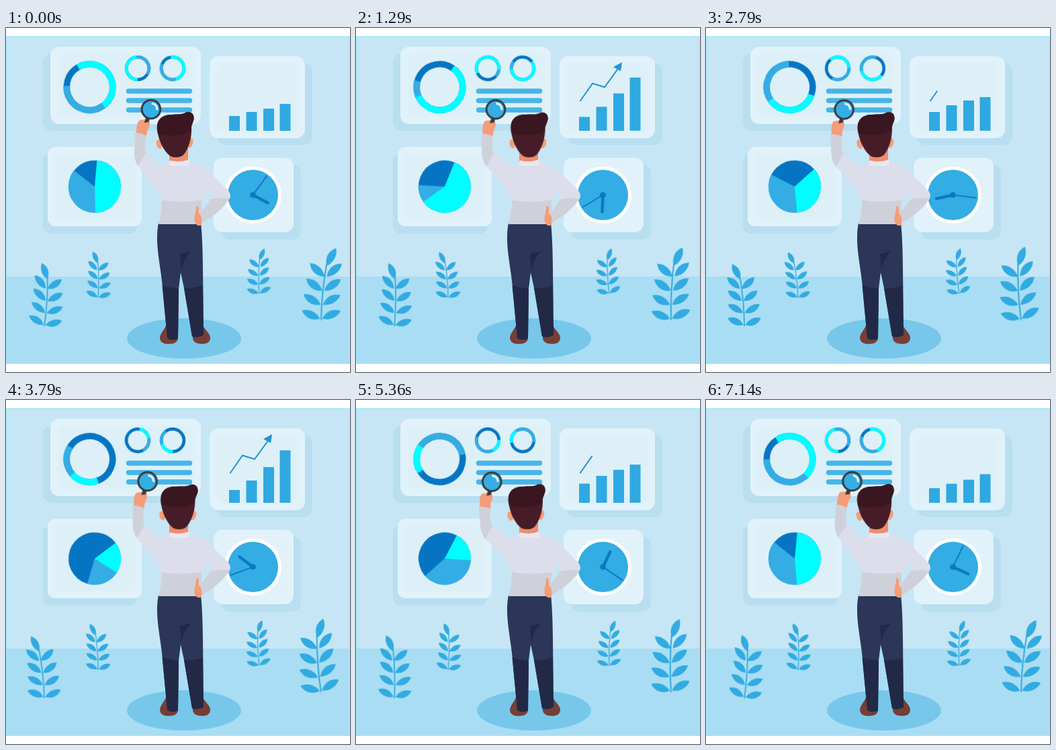
Recreate the animation shown at these times as an HTML page. Size 512 px wide and 512 px high, loop 7.21 s.

```html
<!DOCTYPE html>
<html lang="en">
<head>
<meta charset="utf-8">
<title>Dashboard analysis</title>
<style>
html, body { margin: 0; width: 100%; height: 100%; overflow: hidden; background: #fff; }
svg { display: block; width: 100vw; height: 100vh; }

:root { --loop: 7210ms; --beat: 2403.33ms; --sine: cubic-bezier(.37, 0, .63, 1); }

/* Plants, arm and head swing between two angles */
.swing { animation: swing var(--half) var(--sine) var(--delay, 0ms) infinite alternate; }
@keyframes swing { from { transform: rotate(var(--from)); } to { transform: rotate(var(--to)); } }
.plant { --half: 3605ms; }
.person { --half: 1201.67ms; }

/* Charts: two arcs laid over a dark disc */
.arc { fill: none; }
.dark { stroke: #0575c3; }
.mid { stroke: #33ade4; animation: mid var(--loop) linear infinite; }
.cyan { stroke: #00fdff; animation: cyan var(--loop) linear infinite; }
@keyframes cyan {
  0%, 100% { stroke-dasharray: 173 360; }
  13.9% { stroke-dasharray: 229 360; }
  63.9% { stroke-dasharray: 23 360; }
}
@keyframes mid {
  0%, 98.5%, 100% { stroke-dasharray: 303 360; }
  17.9% { stroke-dasharray: 251 360; }
  38.7% { stroke-dasharray: 249 360; }
  52.6% { stroke-dasharray: 143 360; }
  66.4% { stroke-dasharray: 219 360; }
  83.2% { stroke-dasharray: 181 360; }
}
.spin { animation: spin var(--loop) linear infinite; }
@keyframes spin { from { transform: rotate(0deg); } to { transform: rotate(360deg); } }
.drift { animation: drift var(--loop) linear infinite; }
@keyframes drift {
  0%, 100% { transform: rotate(5deg); }
  17.9% { transform: rotate(22deg); }
  38.7% { transform: rotate(48deg); }
  50% { transform: rotate(56deg); }
  66.4% { transform: rotate(37deg); }
  83.2% { transform: rotate(17deg); }
}

.minute { animation: minute var(--loop) linear infinite; }
@keyframes minute {
  0% { transform: rotate(36deg); }
  17.9% { transform: rotate(239deg); }
  38.7% { transform: rotate(457deg); }
  52.6% { transform: rotate(610deg); }
  66.4% { transform: rotate(756deg); }
  83.2% { transform: rotate(942deg); }
  100% { transform: rotate(1116deg); }
}

.bar { animation: var(--beat) linear infinite; }
.bar:nth-child(1) { animation-name: bar1; }
.bar:nth-child(2) { animation-name: bar2; }
.bar:nth-child(3) { animation-name: bar3; }
.bar:nth-child(4) { animation-name: bar4; }
@keyframes bar1 {
  0%, 100% { transform: scaleY(.22); }
  16% { transform: scaleY(.28); }
  30% { transform: scaleY(.29); }
  50% { transform: scaleY(.22); }
  58% { transform: scaleY(.19); }
}
@keyframes bar2 {
  0%, 100% { transform: scaleY(.28); }
  16% { transform: scaleY(.38); }
  33% { transform: scaleY(.43); }
  50% { transform: scaleY(.38); }
  58% { transform: scaleY(.33); }
}
@keyframes bar3 {
  0%, 100% { transform: scaleY(.33); }
  16% { transform: scaleY(.45); }
  42% { transform: scaleY(.6); }
  50% { transform: scaleY(.58); }
  58% { transform: scaleY(.53); }
}
@keyframes bar4 {
  0%, 100% { transform: scaleY(.4); }
  16% { transform: scaleY(.5); }
  48% { transform: scaleY(.81); }
  58% { transform: scaleY(.78); }
}

.trend { stroke-dasharray: 100 200; animation: trend var(--beat) linear infinite; }
@keyframes trend {
  0%, 5.3% { stroke-dashoffset: 101; }
  56%, 63% { stroke-dashoffset: 0; }
  96%, 100% { stroke-dashoffset: 101; }
}
.tip { animation: tip var(--beat) step-end infinite; }
@keyframes tip { 0% { opacity: 0; } 52% { opacity: 1; } 66% { opacity: 0; } }
</style>
</head>
<body>
<svg viewBox="0 0 512 512">
  <defs>
    <filter id="soft"><feGaussianBlur stdDeviation="3"/></filter>
    <path id="leaf" d="M0 0C-5-5-9-16 0-25.500C7-17 5-6 0 0Z"/>
    <g id="sprig" fill="#31abe1"></g>
  </defs>

  <rect y="12" width="512" height="488" fill="#c6e6f5"/>
  <rect y="370" width="512" height="130" fill="#a9ddf3"/>
  <rect x=".5" y="12.500" width="511" height="487" fill="none" stroke="#9ae8f7"/>

  <g fill="#b8def0">
    <rect x="55" y="38" width="224" height="115" rx="13"/>
    <rect x="314" y="52" width="142" height="122" rx="13"/>
    <rect x="55" y="187" width="140" height="119" rx="11"/>
    <rect x="320" y="203" width="119" height="112" rx="13"/>
  </g>
  <g fill="#e1f2fa">
    <rect x="66" y="28" width="224" height="115" rx="13"/>
    <rect x="303" y="42" width="142" height="122" rx="13"/>
    <rect x="62" y="177" width="140" height="118" rx="11"/>
    <rect x="309" y="193" width="119" height="111" rx="13"/>
  </g>
  <g fill="#ddf0f8" filter="url(#soft)">
    <rect x="76" y="37" width="204" height="97" rx="9"/>
    <rect x="313" y="52" width="122" height="102" rx="9"/>
    <rect x="71" y="186" width="122" height="100" rx="9"/>
  </g>

  <path d="M182.500 94H273.500M182.500 108H273.500M182.500 122H273.500"
        stroke="#45b5e8" stroke-width="7.400" stroke-linecap="round"/>

  <g id="charts"></g>

  <g id="bars" fill="#2fa9e1" transform="translate(332 153)"></g>

  <g fill="none" stroke="#2494d2" stroke-width="2">
    <path class="trend" pathLength="100" d="M333.500 109L352 82.500L370 88L394 55"/>
    <path class="tip" d="M396 51L383 58L394 64Z" fill="#2494d2" stroke="none"/>
  </g>

  <g transform="translate(367.500 248.500)">
    <circle r="42.500" fill="#fff"/>
    <circle r="37.500" fill="#33ade4"/>
    <g stroke="#0b78c1" stroke-linecap="round">
      <path class="minute" d="M0 0V-35" stroke-width="1.900"/>
      <g transform="rotate(118)"><path class="spin" d="M0 0V-25" stroke-width="4.400"/></g>
    </g>
    <circle r="4.300" fill="#0b78c1"/>
  </g>

  <g id="plants"></g>

  <ellipse cx="265" cy="462" rx="85" ry="30" fill="#77c7eb"/>

  <!-- Legs -->
  <g fill="#773e36">
    <path d="M238 443C235 450 229 455 229 462C230 469 237 471 245 470C253 470 257 465 256 459L254 444Z"/>
    <path d="M293 443C297 450 304 455 304 461C304 468 298 471 290 470C281 470 277 465 278 459L279 444Z"/>
  </g>
  <path d="M227 290H290C294 325 293 390 294 457Q286 462 277 459L265 387L260 364L257 388L256 462Q246 467 240 461L233 385C230 352 221 320 227 290Z" fill="#2b3659"/>
  <path d="M232.500 383Q245 387 257 388L256 462Q246 467 240 461ZM265 387Q280 388 293 383L294 457Q286 462 277 459Z" fill="#222947"/>
  <path d="M259 336Q267 335 275 332Q264 345 261 360Z" fill="#222947"/>

  <!-- Raised arm with magnifier -->
  <g transform="translate(215 235)">
    <g class="swing person" style="--from:2.7deg;--to:-7.9deg;--delay:-409ms">
      <g transform="translate(-215 -235)">
        <path d="M193 161C195 150 194 140 199 137L212 136C216 141 214 148 211 151L208 163Z" fill="#f59c78"/>
        <path d="M216 121L208.500 142" stroke="#393a3e" stroke-width="6" stroke-linecap="round"/>
        <circle cx="216" cy="121" r="13.800" fill="#35aee5" stroke="#393a3e" stroke-width="3"/>
        <path d="M218.500 112.500Q225 114 225 121" fill="none" stroke="#e6f8ff" stroke-width="3.200" stroke-linecap="round"/>
        <path d="M199 139Q205 142 212 140L211 148Q205 151 200 147Z" fill="#f59c78"/>
        <path d="M192 156Q201 156 209 161C207 172 206 180 209 186L237 212L232 243C213 226 194 209 191 187Z" fill="#dddeeb"/>
        <path d="M192 156Q201 156 209 161C207 172 206 180 209 186Q202 196 196 205Q191 196 191 187Z" fill="#cfd1da"/>
      </g>
    </g>
  </g>

  <!-- Torso -->
  <path d="M243 178H271V204Q257 210 243 202Z" fill="#ee8d6c"/>
  <path d="M226 208Q237 204 243 198Q257 202 271 197C287 204 297 206 305 216L331 242Q337 250 331 257C320 272 304 284 290 291L286 277Q298 266 306 251L300 241L291 262L290 292H228L232 256L217 229Z" fill="#dddeeb"/>
  <path d="M232 256Q260 261 291 256L290 292H227Q232 273 232 256ZM304 255C313 253 324 252 332 254C320 272 304 284 290 291L286 277Q297 267 304 255Z" fill="#cfd1da"/>
  <path d="M244 197Q257 201 272 196L273 204Q257 207 243 204Z" fill="#e7e8f2"/>
  <path d="M283 266Q286 262 287 270L287 276Q293 280 291 293Q285 297 281 289C279 281 283 275 283 266Z" fill="#f59c78"/>

  <!-- Head -->
  <g transform="translate(255 310)">
    <g class="swing person" style="--from:0deg;--to:2deg;--delay:-2331ms">
      <g transform="translate(-255 -310)">
        <ellipse cx="228" cy="173" rx="4.200" ry="7" fill="#f59c78" transform="rotate(-15 228 173)"/>
        <ellipse cx="274" cy="171" rx="4.200" ry="7.500" fill="#f59c78" transform="rotate(15 274 171)"/>
        <path d="M225 152C223 137 232 129 246 129C256 128 263 129 267 126C275 123 280 128 279.500 135C279 141 275 144 276 152C276 166 271 181 264 189Q256 195 245 191C234 183 227 167 225 152Z" fill="#461c28"/>
        <path d="M225 152C223 137 232 129 246 129C256 128 263 129 267 126C275 123 280 128 279.500 135C279 141 275 144 276 152Q262 160 247 160Q234 160 226 157Z" fill="#3a1621"/>
      </g>
    </g>
  </g>
</svg>

<script>
const fill = (id, items, draw) => {
  document.getElementById(id).innerHTML = items.map(draw).join('');
};

// x, y, mid-line radius, band width, starting angle, motion
const charts = [
  [124.5, 88, 34.3, 9.5, 330, 'spin'],
  [196, 60, 16.8, 4.7, 180, 'spin'],
  [248, 60, 16.8, 4.7, 350, 'spin'],
  [132, 236, 19.5, 39, 0, 'drift'],
];
fill('charts', charts, ([x, y, r, band, angle, motion]) => {
  const arc = tone =>
    `<circle class="arc ${tone}" r="${r}" stroke-width="${band}" pathLength="360"/>`;
  return `<g transform="translate(${x} ${y}) rotate(${angle - 90})">
    <g class="${motion}">${['dark', 'mid', 'cyan'].map(arc).join('')}</g></g>`;
});

// Bars share one baseline and grow upwards from it
fill('bars', [0, 25.5, 51, 75.5], x =>
  `<rect class="bar" x="${x}" y="-100" width="16" height="100"/>`);

// Leaf pairs open wider towards the ground
const leaf = (x, y, angle) =>
  `<use href="#leaf" transform="translate(${x} ${y}) rotate(${angle})"/>`;
const stem = '<path d="M0 0Q0-35 6-73" fill="none" stroke="#31abe1" stroke-width="1.800"/>';
fill('sprig', [0, 1, 2, 3], row => {
  const x = row * row * 0.55, y = -2 - row * 18, spread = 66 - row * 6;
  return leaf(x - 1.5, y, -spread) + leaf(x + 1.5, y, spread);
});
document.getElementById('sprig').innerHTML += stem + leaf(6, -70, 27);

// x, y, scale, mirror, widest and narrowest angle, delay
const plants = [
  [57, 444, 1, -1, 8.5, -1.5, 0],
  [469, 435, 1.16, 1, 1, -9, 0],
  [137, 402, 0.74, -1, 6.5, -2, -1210],
  [377, 396, 0.72, 1, -2.5, -9.5, -1210],
];
fill('plants', plants, ([x, y, size, side, from, to, delay]) =>
  `<g transform="translate(${x} ${y})">
    <g class="swing plant" style="--from:${from}deg;--to:${to}deg;--delay:${delay}ms">
      <use href="#sprig" transform="scale(${size * side} ${size})"/></g></g>`);
</script>
</body>
</html>
```
